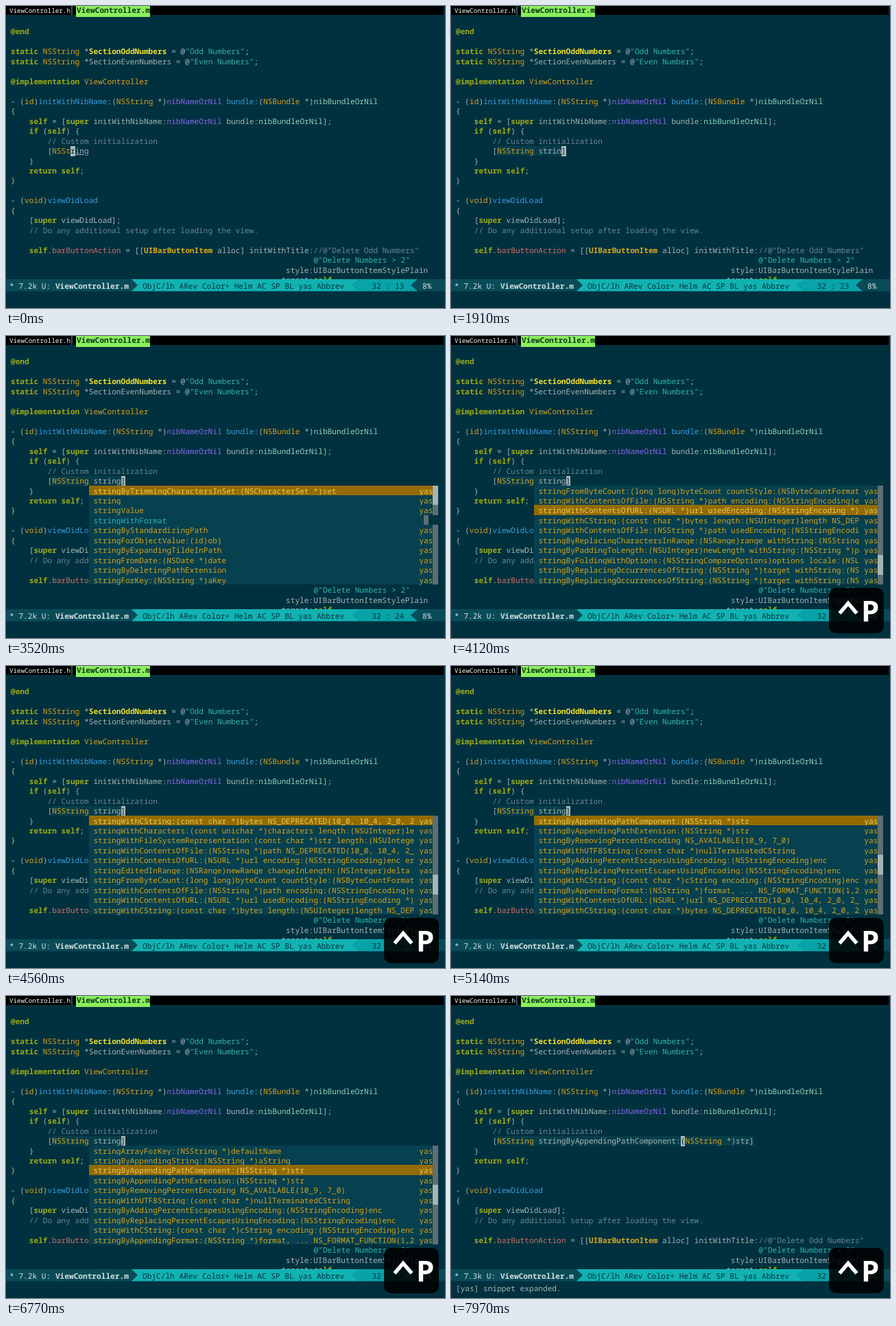
An HTML page that plays this animation: 640 px wide and 440 px high, repeating every 8000 ms.

```html
<!DOCTYPE html>
<html lang="en">
<head>
<meta charset="utf-8">
<title>Editor completion</title>
<style>
html, body { margin: 0; width: 100%; height: 100%; overflow: hidden; background: #01313f; }
#stage {
  position: relative; width: 640px; height: 440px; overflow: hidden;
  background: #01313f; color: #a3b4b5;
  font: 11.15px/16.4px "Noto Sans Mono", "DejaVu Sans Mono", monospace;
  text-rendering: geometricPrecision; font-variant-ligatures: none;
}
#stage div, #stage span, svg { position: absolute; white-space: pre; }
.k { color: #9cab16; font-weight: 600; }
.t { color: #d0a01c; }
.T { color: #d8a81c; font-weight: 700; }
.b { color: #3a9bdc; }
.v { color: #8366ea; }
.g { color: #8cd3ba; }
.s { color: #38b0aa; }
.c { color: #678690; }
.y { color: #f0e02c; font-weight: 700; }
.r { color: #cb6d68; }
.u { color: #a3b3b4; text-decoration: underline; }
.x { color: #02303c; background: #a9b6b8; height: 14.48px; }
#head { left: 0; top: 0; width: 638px; height: 12.5px; background: #000; }
#gap { left: 95px; top: 0; width: 1.5px; height: 12.5px; background: #2a5560; }
#tabA { left: 5px; top: 0; font-size: 9.27px; line-height: 14.48px; color: #f4f6f6; }
#tabB {
  left: 101.5px; top: 0; width: 108px; height: 15.5px; text-indent: 1.5px;
  background: #8bee5c; color: #0b3a1c; font-weight: 600; line-height: 14px;
}
#glow { left: 67.2px; top: 204px; height: 14.48px; background: #083d4a; }
#bar { left: 0; top: 0; }
.mode { top: 401px; color: #d3dede; }
.dark { color: #02343f; font-weight: 500; }
#menu { left: 120.7px; top: 217.5px; width: 509px; height: 144.8px; line-height: 18.2px; font-weight: 500; }
.item { left: 0; width: 509px; height: 14.6px; background: #07404f; color: #d2a21c; }
.item.plain { width: 488px; color: #2fb0b0; }
.item.on { background: #946b00; color: #e6c964; }
.rail { width: 7.2px; height: 14.6px; background: #5f6e73; }
.rail.thumb { background: #a7b3b4; }
#key { left: 551px; top: 367px; width: 80px; height: 66px; border-radius: 10px; background: rgba(0,0,0,.87); }
#key span { left: 47px; top: 5px; font: 700 42px/57px "Open Sans", "Noto Sans", sans-serif; color: #fff; }
#key svg { left: 0; top: 0; }
</style>
</head>
<body>
<div id="stage">
  <div id="head"></div>
  <div id="gap"></div>
  <div id="tabA">ViewController.h</div>
  <div id="tabB">ViewController.m</div>
  <div id="glow"></div>
  <div id="code"></div>
  <div id="edit"></div>
  <svg id="bar" width="640" height="440">
    <rect y="398" width="640" height="17.5" fill="#0a4b58"/>
    <path d="M183 398H515L505 406.7L515 415.5H183L192 406.7Z" fill="#12b2b2"/>
    <path d="M515 398H600L590 406.7L600 415.5H515L505 406.7Z" fill="#08a3a8"/>
  </svg>
  <div id="modes"></div>
  <div id="menu"></div>
  <div id="key">
    <svg width="80" height="66"><path d="M15.5 37L28 22.500L40.500 37" fill="none" stroke="#fff" stroke-width="5.500"/></svg>
    <span>P</span>
  </div>
</div>
<script>
const CW = 6.69, LH = 14.48, LEFT = 7, TOP = 15.8, LOOP = 8000;
const $ = id => document.getElementById(id);

function add(parent, tag, cls, left, top, text = "") {
  const el = document.createElement(tag);
  el.className = cls;
  el.style.left = left + "px";
  if (top !== null) el.style.top = top + "px";
  el.textContent = text;
  parent.append(el);
  return el;
}

// Markup: §kword§ gives "word" the class k.
function putLine(parent, row, col, markup) {
  markup.split("§").forEach((part, i) => {
    const cls = i % 2 ? part[0] : "", text = i % 2 ? part.slice(1) : part;
    if (text) add(parent, "span", cls, LEFT + col * CW, TOP + row * LH, text);
    col += text.length;
  });
}

const code = {
  1: "§k@end§",
  3: '§kstatic§ §tNSString§ *§ySectionOddNumbers§ = @§s"Odd Numbers"§;',
  4: '§kstatic§ §tNSString§ *SectionEvenNumbers = @§s"Even Numbers"§;',
  6: "§k@implementation§ §tViewController§",
  8: "- (§tid§)§binitWithNibName§:(§tNSString§ *)§vnibNameOrNil§ §bbundle§:(§tNSBundle§ *)§gnibBundleOrNil§",
  9: "{",
  10: "    §kself§ = [§ksuper§ initWithNibName:§vnibNameOrNil§ bundle:§gnibBundleOrNil§];",
  11: "    §kif§ (§kself§) {",
  12: "        §c// Custom initialization§",
  14: "    }",
  15: "    §kreturn§ §kself§;",
  16: "}",
  18: "- (§tvoid§)§bviewDidLoad§",
  19: "{",
  20: "    [§ksuper§ viewDidLoad];",
  21: "    §c// Do any additional setup after loading the view.§",
  23: '    §kself§.§rbarButtonAction§ = [[§TUIBarButtonItem§ alloc] initWithTitle:§c//@"Delete Odd Numbers"§',
  24: " ".repeat(66) + '§s@"Delete Numbers > 2"§',
  25: " ".repeat(60) + "style:UIBarButtonItemStylePlain",
  26: " ".repeat(59) + "target:§kself§"
};
for (const row in code) putLine($("code"), +row, 0, code[row]);

const modes = $("modes");
add(modes, "span", "mode", 5, null, "*");
const size = add(modes, "span", "mode", 5 + 2 * CW, null);
add(modes, "span", "mode", 5 + 10 * CW, null, "ViewController.m").style.fontWeight = 600;
add(modes, "span", "mode dark", 199, null, "ObjC/lh ARev Color+ Helm AC SP BL yas Abbrev");
const place = add(modes, "span", "mode dark", 533.5, null);
add(modes, "span", "mode", 607, null, "8%");
const echo = add(modes, "span", "", 7, 418.5);

const STR = "(NSString *)", ENC = "(NSStringEncoding)", CHR = "(const char *)";
const OLD = " NS_DEPRECATED(10_0, 10_4, 2_0, 2_0)", ERR = " error:(NSError **)error";
const head = [
  "stringByTrimmingCharactersInSet:(NSCharacterSet *)set", "string", "stringValue",
  "stringWithFormat", "stringByStandardizingPath", "stringForObjectValue:(id)obj",
  "stringByExpandingTildeInPath", "stringFromDate:(NSDate *)date",
  "stringByDeletingPathExtension", `stringForKey:${STR}aKey`
];
const tail = [
  `stringArrayForKey:${STR}defaultName`,
  `stringByAppendingString:${STR}aString`,
  `stringByAppendingPathComponent:${STR}str`,
  `stringByAppendingPathExtension:${STR}str`,
  "stringByRemovingPercentEncoding NS_AVAILABLE(10_9, 7_0)",
  `stringWithUTF8String:${CHR}nullTerminatedCString`,
  `stringByAddingPercentEscapesUsingEncoding:${ENC}enc`,
  `stringByReplacingPercentEscapesUsingEncoding:${ENC}enc`,
  `stringWithCString:${CHR}cString encoding:${ENC}enc`,
  `stringByAppendingFormat:${STR}format, ... NS_FORMAT_FUNCTION(1,2)`,
  "stringWithContentsOfURL:(NSURL *)url" + OLD,
  `stringWithCString:${CHR}bytes` + OLD,
  "stringWithCharacters:(const unichar *)characters length:(NSUInteger)length",
  `stringWithFileSystemRepresentation:${CHR}str length:(NSUInteger)len`,
  `stringWithContentsOfFile:${STR}path` + OLD,
  `stringWithContentsOfURL:(NSURL *)url encoding:${ENC}enc` + ERR,
  "stringEditedInRange:(NSRange)newRange changeInLength:(NSInteger)delta",
  "stringFromByteCount:(long long)byteCount countStyle:(NSByteCountFormatterCountStyle)countStyle",
  `stringWithContentsOfFile:${STR}path encoding:${ENC}enc` + ERR,
  "stringWithContentsOfURL:(NSURL *)url usedEncoding:(NSStringEncoding *)enc" + ERR,
  `stringWithCString:${CHR}bytes length:(NSUInteger)length` + OLD,
  `stringWithContentsOfFile:${STR}path usedEncoding:(NSStringEncoding *)enc` + ERR,
  "stringByReplacingCharactersInRange:(NSRange)range withString:(NSString *)replacement",
  `stringByPaddingToLength:(NSUInteger)newLength withString:${STR}padString startingAtIndex:(NSUInteger)padIndex`,
  "stringByFoldingWithOptions:(NSStringCompareOptions)options locale:(NSLocale *)locale",
  `stringByReplacingOccurrencesOfString:${STR}target withString:${STR}replacement`,
  `stringByReplacingOccurrencesOfString:${STR}target withString:${STR}replacement options:(NSStringCompareOptions)options`
];
const TOTAL = 46, ROWS = 10, BASE = TOTAL - tail.length;

// [time, cursor column]
const typing = [[0, 13], [440, 14], [590, 15], [740, 17], [1030, 18], [1330, 19],
  [1480, 20], [1620, 21], [1770, 22], [1910, 23], [2060, 24], [7220, 49]];
const MENU_IN = 2500, KEY_IN = 3670, DONE = 7220, CLOSE_IN = 1330;
const REFRESH = 147, REPEAT = 61, HELD_FROM = KEY_IN - 40;

// Held ^P wraps to the last item and climbs, then two steps go back down: [time, item]
const picks = [];
for (let t = KEY_IN, item = TOTAL; item > BASE; t += REFRESH) {
  item = Math.max(BASE, TOTAL - 1 - Math.floor((t - HELD_FROM) / REPEAT));
  picks.push([t, item]);
}
picks.push([5880, BASE + 1], [6020, BASE + 2]);

const past = (list, t) => list.filter(p => p[0] <= t).map(p => p[1]);

function drawEdit(t, col) {
  const edit = $("edit");
  edit.replaceChildren();
  const closed = t >= CLOSE_IN, word = "NSString";
  let line, end = col + 1;
  if (t >= DONE) {
    line = "[§tNSString§ stringByAppendingPathComponent:§x(§§tNSString§ *)str]";
    end = 65;
  } else if (col < 17) {
    const n = col - 9;
    line = `[§t${word.slice(0, n)}§§x${word[n]}§§u${word.slice(n + 1)}§`;
  } else {
    line = `[§t${word}§${" string".slice(0, col - 17)}§x${closed ? "]" : " "}§`;
  }
  putLine(edit, 13, 8, line);
  const glow = $("glow").style;
  glow.display = closed ? "" : "none";
  glow.width = (end - 9) * CW + "px";
}

function drawMenu(t) {
  const menu = $("menu");
  menu.replaceChildren();
  if (t < MENU_IN || t >= DONE) return;
  const path = past(picks, t), moved = path.length > 0;
  const top = moved ? Math.min(TOTAL - ROWS, ...path) : 0;
  const sel = moved ? path.at(-1) : 0;
  const thumb = Math.floor(top * ROWS / TOTAL);
  for (let i = 0; i < ROWS; i++) {
    const text = moved ? tail[top + i - BASE] : head[i];
    const plain = text === "stringWithFormat";
    const row = add(menu, "div", "item" + (plain ? " plain" : "") + (top + i === sel ? " on" : ""), 0, i * LH);
    add(row, "span", "", CW, 0, text.slice(0, 70));
    if (!plain) add(row, "span", "", 72 * CW, 0, "yas");
    add(row, "span", "rail" + (i === thumb || i === thumb + 1 ? " thumb" : ""), plain ? 488 : 501.8, 0);
  }
}

const cuts = [0, MENU_IN, DONE, ...typing.map(p => p[0]), ...picks.map(p => p[0])];
let shown = -1;

function draw(t) {
  const cut = Math.max(...cuts.filter(c => c <= t));
  if (cut === shown) return;
  shown = cut;
  const col = past(typing, t).at(-1), done = t >= DONE;
  drawEdit(t, col);
  drawMenu(t);
  size.textContent = (done ? "7.3k" : "7.2k") + " U:";
  place.textContent = "32 : " + col;
  echo.textContent = done ? "[yas] snippet expanded." : "";
  $("key").style.display = t >= KEY_IN ? "" : "none";
}

const start = performance.now();
function tick() {
  draw((performance.now() - start) % LOOP);
  requestAnimationFrame(tick);
}
draw(0);
requestAnimationFrame(tick);
</script>
</body>
</html>
```
